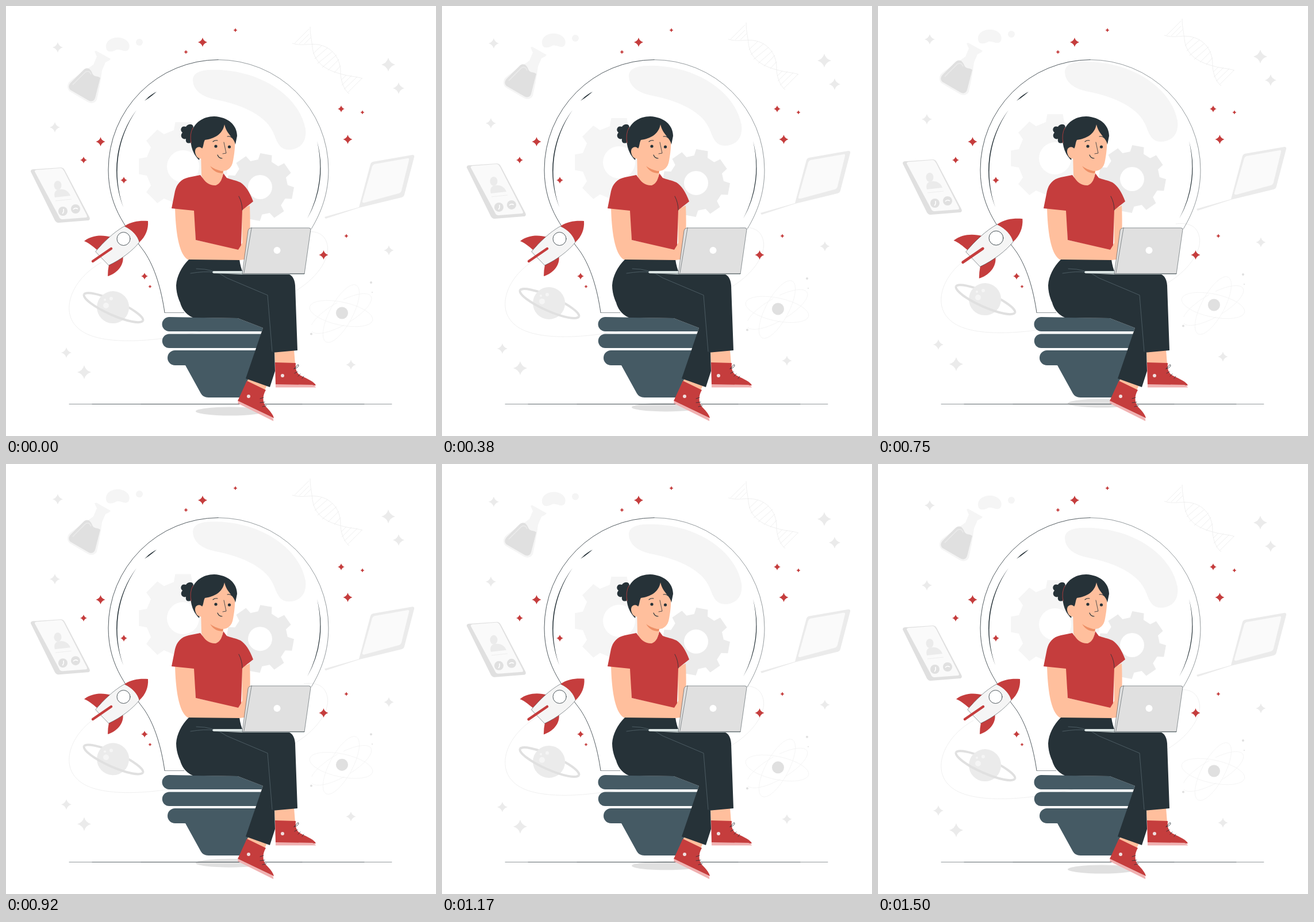
Write an HTML page that moves like this. It is 748 px wide and 748 px high and loops after 1540 ms.

```html
<!DOCTYPE html>
<html>
<head>
<meta charset="utf-8">
<style>
html, body { margin: 0; width: 100%; height: 100%; overflow: hidden; background: #fff }
svg { display: block; width: 100%; height: 100% }
.line { fill: none; stroke: #263238; stroke-width: .8; stroke-linecap: round; stroke-linejoin: round }
.thin { stroke-width: .5 } .bold { stroke-width: 1.1 }
.faint { fill: none; stroke: #e8e8e8; stroke-width: .7 }
.dark { fill: #263238 } .slate { fill: #455a64 } .skin { fill: #ffbf9d } .red { fill: #c53d3d }
.g1 { fill: #f5f5f5 } .g2 { fill: #ebebeb } .g3 { fill: #e0e0e0 } .g4 { fill: #fafafa }
</style>
</head>
<body>
<svg viewBox="0 0 748 748">
<g id="float">
  <ellipse class="g3" cx="390" cy="705" rx="60" ry="7.5"/>
  <path class="faint" d="M166 446C112 477 96 530 122 557C152 592 250 586 330 568C420 548 480 515 505 495C545 470 566 435 558 412C552 393 535 391 518 393"/>
  <path class="g1" d="M360 111C440 110 510 155 521 214C524 240 508 250 492 250C477 250 472 238 467 225C455 190 410 172 366 163C340 158 325 146 325 128C326 114 343 111 360 111Z"/>
  <g id="gears"></g>
  <g id="greyStars" class="g2"></g>

  <!-- flask -->
  <path class="g1" d="M154 79L157 78L182 92L179 95L173 98L167 112C165 130 161 150 158 163C154 170 148 170 142 167L110 148C106 143 106 137 110 132C124 120 142 110 152 102L158 88ZM174 72C173 60 185 54 198 55C212 57 218 68 213 76C207 82 200 74 192 76C186 80 175 82 174 72Z"/>
  <circle class="g1" cx="232" cy="63" r="6"/>
  <path class="g3" d="M113 133L134 112C141 105 147 109 150 117C153 124 159 121 164 125L155 160C153 166 148 167 143 164L112 146C108 142 109 137 113 133Z"/>
  <path d="M116 137L138 115Q145 111 148 119" fill="none" stroke="#ebebeb" stroke-width="1.5"/>

  <!-- helix -->
  <path class="faint" d="M498 65C515 70 525 65 542 67C568 71 583 92 582 118C583 135 590 147 597 153M529 36C529 50 532 60 533 72C536 98 555 111 582 118C598 123 608 122 620 126M502 65L527 40M510 66L527 49M519 66L530 55M534 83L549 69M537 92L559 73M542 100L568 79M550 107L575 85M560 112L579 93M571 116L582 104M583 129L592 120M584 138L601 121M588 145L611 123M594 151L619 126"/>

  <!-- phone -->
  <path class="g3" d="M43 288C43 284 46 284 50 284L95 281C99 281 101 283 103 287L145 367C147 371 145 373 142 373L92 377C88 377 86 375 84 371Z"/>
  <path class="g4" d="M50 288C50 285 53 285 56 285L94 282C98 282 99 284 101 287L140 363C142 367 141 368 138 368L99 371C95 371 93 369 92 366Z"/>
  <g class="g2"><ellipse cx="90" cy="312" rx="6.5" ry="8"/><path d="M85 333C82 323 88 319 94 319C102 318 109 322 112 330Z"/></g>
  <path class="faint" d="M86 339L114 336"/>
  <g class="g3"><circle cx="99" cy="357" r="8"/><circle cx="121" cy="353" r="8"/></g>
  <path d="M98 361Q101 359 100 353M117 354Q120 350 125 353" fill="none" stroke="#fff" stroke-width="1.6"/>

  <!-- open computer -->
  <path class="g2" d="M554 367L614 350L634 275Q635 272 638 271L707 259Q711 259 710 263L693 328Q692 332 688 333L614 351L556 370Z"/>
  <path class="g4" d="M637 279Q638 276 641 275L698 265Q702 264 701 268L688 321Q687 325 683 326L624 342Q619 343 620 339Z"/>

  <!-- planet -->
  <g transform="translate(187 524.500) rotate(24)" fill="none" stroke="#e0e0e0" stroke-width="4">
    <path d="M-56 0A56 12 0 0 1 56 0"/>
    <circle class="g2" r="28" cx="-1" stroke="none"/>
    <path d="M-56 0A56 13 0 0 0 56 0"/>
  </g>
  <g class="g1"><circle cx="174" cy="521" r="5"/><circle cx="183" cy="509" r="3"/><circle cx="172" cy="511" r="2"/></g>

  <!-- atom -->
  <g transform="translate(583 535)" class="faint" opacity=".6">
    <ellipse rx="56" ry="20" transform="rotate(12)"/>
    <ellipse rx="56" ry="20" transform="rotate(-62)"/>
    <ellipse rx="60" ry="20" transform="rotate(-30)" stroke-dasharray="60 12"/>
  </g>
  <g class="g3"><circle cx="584.500" cy="534" r="10.500"/><circle cx="531" cy="570.500" r="2"/><circle cx="635" cy="481" r="2"/><circle cx="637" cy="498" r="1"/></g>
</g>

<path class="line thin" d="M110 692.500H671M150 692.500H623M235 692.500H515"/>
<!-- bulb -->
<path class="line thin" d="M310 533.500H276M369 93.500A191.500 191.500 0 0 1 561 285C561 325 549 358 531 388"/>
<path class="line" d="M276 533C270 492 259 455 241 428C215 392 178 355 178 285A191.500 191.500 0 0 1 369 93.500"/>
<path class="dark" d="M227 181A176 176 0 0 0 204 350A188 188 0 0 1 227 181ZM541 235A176 176 0 0 1 524 370A192 192 0 0 0 541 235ZM262 149Q250 155 241 165Q252 158 262 149Z"/>
<g class="slate">
  <path d="M284 541L403 543L447 560L445 566H284A12.500 12.500 0 0 1 284 541Z"/>
  <path d="M284 570.500H444L437 595H284A12.200 12.200 0 0 1 284 570.500Z"/>
  <path d="M294 599H436L425 681H352Q343 681 339 674L312 625H294A13 13 0 0 1 294 599Z"/>
</g>

<!-- legs and shoes -->
<path class="skin" d="M467 599L501 598L503 623H468ZM423 646L454 660L448 672L417 657Z"/>
<path class="dark" d="M318 441H406Q408 455 413 466H488C497 466 502 474 503 486L507 599L463 603L467 602L468 635L459 663L417 648L447 560L403 543L325 542C311 536 305 524 303 516C299 508 296 496 296 486C297 470 305 454 318 441Z"/>
<path class="line" style="stroke:#56666e" d="M331 457Q362 457 384 473L455 503L463 601M321 465Q345 461 362 463"/>
<path class="red" d="M468 620L504 621C503 633 506 639 513 643C525 649 537 654 539 660L469 660ZM419 652L452 668C445 680 447 690 452 697C459 704 465 711 466 717L403 687Z"/>
<path fill="#f0b1b1" d="M469 658L533 659Q538 660 539 663.500H469ZM404 687L462 715Q466 718 465 722L403 691Z"/>
<g fill="#f0dede"><circle cx="481" cy="643" r="3"/><circle cx="422" cy="679" r="3"/></g>
<path class="line" d="M501 631L505 627Q509 621 509 626Q507 630 501 631M502 639L507 636M508 644L512 640M515 648L518 644M442 683L448 681M442 690L450 689M446 697L453 695"/>

<!-- torso -->
<path class="skin" d="M294 350L328 354L330 407L404 423L411 412L410 354L424 347C425 370 425 395 423 440L406 442L316 441C300 431 295 390 294 350Z"/>
<path class="red" d="M338 294L318 298C304 301 297 310 294 322L288 352L327 356L330 407L404 424L409 416L411 355L430 340C424 323 416 312 408 307C400 303 391 302 384 299L378 291C374 314 352 314 338 294Z"/>
<path class="line" d="M405 331Q411 342 411 355"/>
<path class="skin" d="M339 255L340 295C346 308 356 313 365 312C373 309 377 300 378 288L365 270Z"/>
<path fill="#ed8f66" d="M354 276Q366 285 378 286L377 291Q361 291 354 276Z"/>

<!-- head -->
<path class="dark" d="M325 215C329 205 318 203 313 210C304 207 302 217 307 220C301 227 308 233 313 231C312 237 315 240 321 238L325 225Z"/>
<path class="skin" d="M338 225L380 203L397 222C400 240 397 258 395 269C393 282 385 288 374 287C361 284 347 275 340 262Z"/>
<path class="dark" d="M336 268C324 257 318 237 323 220C327 203 343 192 362 192C386 193 402 207 402 226L399 241C397 229 384 224 380 206C377 223 362 231 346 233C343 238 344 244 341 248L337 262Z"/>
<path class="skin" d="M342 249C338 242 328 245 329 254C330 262 335 267 341 265Z"/>
<path class="line" style="stroke:#c53d3d" d="M325 212Q319 223 322 238"/>
<g class="dark"><circle cx="365" cy="244" r="2.600"/><circle cx="388.500" cy="245" r="2.600"/></g>
<path class="line bold" d="M360 236Q363 233 368 234M385 227Q390 226 393 229M368 259Q370 265 376 265"/>
<path class="line" d="M379 237L383 256L377 257"/>

<!-- computer on lap -->
<path fill="#dce5e4" d="M361 461H412L519 464V467H411L361 465Q357 463 361 461Z"/>
<path class="line thin" style="fill:#e0e0e0" d="M427 386H527Q530 386 530 389L519 466H411L421 391Q422 386 427 386Z"/>
<path class="line thin" d="M427 387L414 464M361 465.500H519"/>
<circle cx="471.500" cy="425" r="6" fill="#fff"/>

<g id="rocket">
  <path class="red" d="M136 409C150 398 168 398 183 402L158 424C151 418 144 412 136 409ZM177 470C191 466 207 452 203 433L179 450Q177 460 177 470Z"/>
  <path class="line thin" style="fill:#f5f5f5" d="M156 427C170 410 188 393 206 383C222 390 230 401 232 411C220 426 200 441 179 451Z"/>
  <path class="red" d="M206 383C219 374 234 373 247 374C248 388 243 401 232 411C229 400 220 390 206 383Z"/>
  <circle class="line" style="fill:#fff" cx="204.500" cy="405" r="11.500"/>
  <path d="M151 444L183 422" stroke="#c53d3d" stroke-width="4.500" stroke-linecap="round"/>
</g>
<g id="redStars" class="red"></g>
</svg>
<script>
const byId = id => document.getElementById(id);
const star = ([x, y, r]) =>
  `<path transform="translate(${x} ${y}) scale(${r})" d="M0-1Q.22-.22 1 0Q.22 .22 0 1Q-.22 .22-1 0Q-.22-.22 0-1Z"/>`;

function gear(cx, cy, inner, outer, hole, turn, cls) {
  const points = [];
  for (let i = 0; i < 8; i++)
    for (const [r, a] of [[inner, -.25], [outer, -.175], [outer, .175], [inner, .25]]) {
      const angle = turn + i * Math.PI / 4 + a;
      points.push(`${cx + r * Math.cos(angle)} ${cy + r * Math.sin(angle)}`);
    }
  return `<path class="${cls}" d="M${points.join('L')}Z"/><circle cx="${cx}" cy="${cy}" r="${hole}" fill="#fff"/>`;
}

byId('gears').innerHTML = gear(308, 279, 65, 78, 28, 0, 'g1') + gear(442, 315, 48, 59, 21, .18, 'g2');
byId('greyStars').innerHTML = [
  [90, 72, 9], [85, 211, 9], [665, 102, 12], [683, 143, 10],
  [105, 603, 9], [136, 637, 12], [600, 624, 8.5], [666, 425, 8.5]
].map(star).join('');
byId('redStars').innerHTML = [
  [342, 63, 8], [399, 42, 3.5], [313, 80, 3.5], [583, 179, 6], [620, 185, 3.5], [594.5, 232, 8], [164.5, 236, 8],
  [135, 268, 6], [205, 303, 6], [241, 470, 6], [250.5, 488, 3], [592, 400, 3.5], [552.5, 433, 8]
].map(star).join('');

const LOOP = 1540, CYCLE = 1500, BEAT = 500;

function draw(now) {
  const t = Math.min(now % LOOP, CYCLE);
  const lift = 14 * (1 - Math.abs(2 * t / CYCLE - 1));
  // short swell in the middle of each beat
  const near = Math.max(0, 1 - Math.abs(t % BEAT / BEAT - .5) / .17);
  const scale = 1 + .08 * Math.sin(near * Math.PI / 2);
  byId('float').setAttribute('transform', `translate(0 ${-lift})`);
  byId('rocket').setAttribute('transform', `translate(192 422) scale(${scale}) translate(-192 -422)`);
  requestAnimationFrame(draw);
}
draw(performance.now());
</script>
</body>
</html>
```
